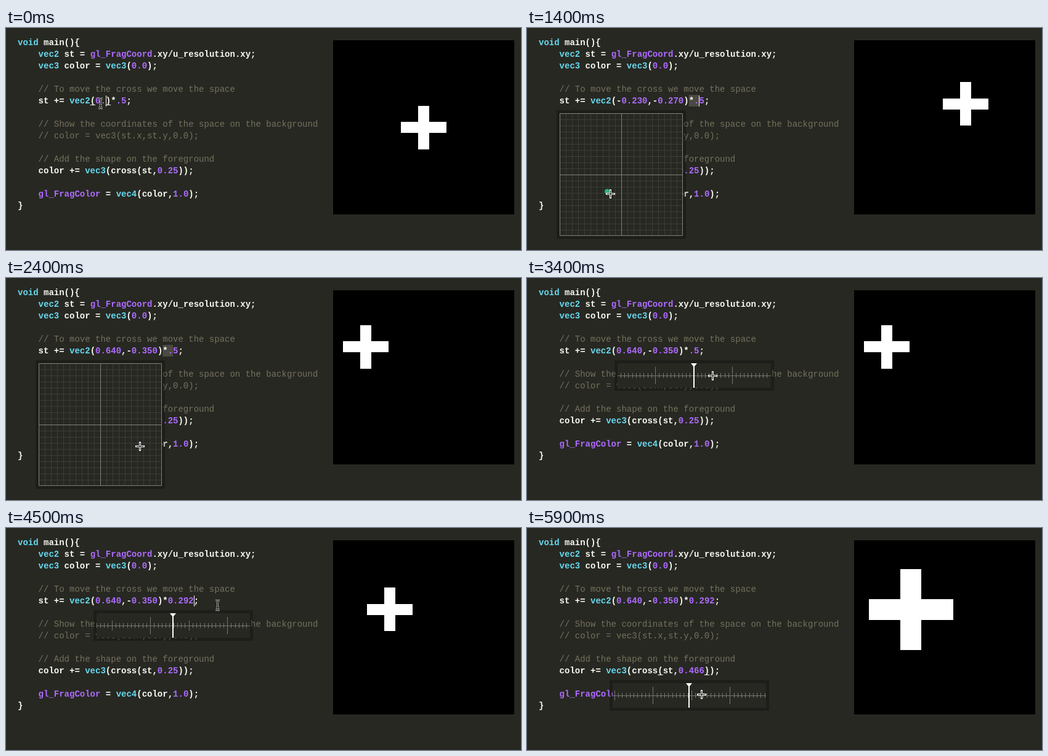
Write an HTML page that moves like this. It is 836 px wide and 362 px high and loops after 6 s.

```html
<!DOCTYPE html>
<html lang="en">
<head>
<meta charset="utf-8">
<title>Moving a cross in shader space</title>
<style>
  html, body { margin: 0; width: 100%; height: 100%; overflow: hidden; background: #272822; }
  svg { display: block; width: 836px; height: 362px; }
  text { font: bold 14px "Liberation Mono", "Courier New", monospace; fill: #f8f8f2; white-space: pre; }
  .type { fill: #66d9ef; }
  .num { fill: #ae6bff; }
  .note { fill: #75715e; font-weight: normal; }
</style>
</head>
<body>
<svg viewBox="0 0 836 362">
  <defs>
    <clipPath id="view"><rect x="531" y="20" width="294" height="284"/></clipPath>
    <clipPath id="track"><rect x="-124" y="-20" width="249" height="40"/></clipPath>
  </defs>
  <rect width="836" height="362" fill="#272822"/>
  <rect id="sel" height="19" fill="#4b4a42"/>
  <g id="code"></g>
  <path id="match" stroke="#f8f8f2" fill="none"/>
  <rect id="caret" width="1" height="18" fill="#f8f8f0"/>
  <rect x="531" y="20" width="294" height="284"/>
  <path id="cross" fill="#fff" clip-path="url(#view)" shape-rendering="crispEdges"/>

  <g id="pad">
    <path d="M48 134h210v210h-210zM53 139v200h200v-200z" fill="#000" fill-opacity=".25"/>
    <rect x="53" y="139" width="200" height="200" fill="#272822"/>
    <path id="grid" stroke="#3d3d38" fill="none"/>
    <path d="M53.5 139.5h199v199h-199zM153.5 139v200M53 239.5h200" stroke="#82827b" fill="none"/>
    <circle id="dot" r="4" fill="#2fb577"/>
  </g>

  <g id="slider">
    <path d="M-129 -25h259v50h-259zM-124 -20v40h249v-40z" fill="#000" fill-opacity=".25"/>
    <rect x="-124" y="-20" width="249" height="40" fill="#272822"/>
    <path id="ticks" stroke="#77776f" fill="none" clip-path="url(#track)"/>
    <path d="M-5 -20h10l-4 5v35h-2v-35z" fill="#fff"/>
  </g>

  <g id="mouse" fill="none">
    <path id="halo"/>
    <path id="core" stroke="#111"/>
  </g>
</svg>
<script>
const $ = id => document.getElementById(id);
const LOOP = 6000, STEP = 100;
const CHAR = 8.4, LEFT = 52.6;
const BEAM = "M-3 -8q3.5 0 3.5 3v10q0 3 -3.5 3M4 -8q-3.5 0 -3.5 3M4 8q-3.5 0 -3.5 -3M-2 3.5h5";
const PLUS = "M-5.5 .5h12M.5 -5.5v12";

// Eased 0 to 1 between two times
function ease(t, a, b) {
  const k = Math.min(1, Math.max(0, (t - a) / (b - a)));
  return k * k * (3 - 2 * k);
}
const within = (t, a, b) => t >= a && t < b;
const show = (id, on) => $(id).setAttribute("visibility", on ? "visible" : "hidden");
const set = (id, attrs) => { for (const k in attrs) $(id).setAttribute(k, attrs[k]); };

// The pad is dragged round in a spiral that ends at (.64, -.35)
const A = Math.atan2(-.27, -.23), B = Math.atan2(-.35, .64) + 2 * Math.PI;
const R = Math.hypot(.23, .27), S = Math.hypot(.35, .64);
function spiral(t) {
  const a = A + (B - A) * (Math.min(t, 2400) - 1400) / 1000;
  const r = R * ease(t, 700, 900) + (S - R) * ease(t, 2000, 2400);
  return [r * Math.cos(a), r * Math.sin(a)];
}

// Pointer glides: start, end, x, y
const glides = [
  [200, 500, 154, 239], [700, 2400, 217, 274], [2500, 2800, 275, 122],
  [3000, 3300, 301, 159], [3400, 4400, 327, 159], [4400, 4500, 343, 126],
  [4700, 5100, 268, 235], [5200, 5400, 310, 271], [5400, 5900, 283, 271]
];
function pointer(t, scalePx) {
  if (within(t, 800, 2400)) {
    const [x, y] = spiral(t + 22);
    return [153 + 100 * x, 239 - 100 * y];
  }
  if (within(t, 3400, 4400)) return [301 + scalePx, 159];
  let x = 153, y = 123;
  for (const [a, b, px, py] of glides) {
    const k = ease(t, a, b);
    x += (px - x) * k;
    y += (py - y) * k;
  }
  return [x, y];
}

function paint(line) {
  return line.replace(/\/\/.*|[A-Za-z_]\w*|\d+\.\d*|\.\d+/g, s => {
    const kind = s.startsWith("//") ? "note"
      : /^(void|vec\d)$/.test(s) ? "type"
      : /^(gl_|[\d.])/.test(s) ? "num" : "";
    return kind ? `<tspan class="${kind}">${s}</tspan>` : s;
  });
}

const lines = [
  "void main(){",
  "    vec2 st = gl_FragCoord.xy/u_resolution.xy;",
  "    vec3 color = vec3(0.0);",
  "",
  "    // To move the cross we move the space",
  "",
  "",
  "    // Show the coordinates of the space on the background",
  "    // color = vec3(st.x,st.y,0.0);",
  "",
  "    // Add the shape on the foreground",
  "",
  "",
  "    gl_FragColor = vec4(color,1.0);",
  "}"
];
$("code").innerHTML = lines.map((s, i) =>
  `<text x="19" y="${28 + 19 * i}">${paint(s)}</text>`).join("");
const rows = $("code").children;

let grid = "";
for (let i = 10; i < 200; i += 10) grid += `M${53.5 + i} 140v198M54 ${139.5 + i}h198`;
set("grid", { d: grid });

function drawCross(x, y, scale, size) {
  const cx = 678 - x * scale * 294, cy = 162 + y * scale * 284;
  const bar = (w, h) => `M${cx - w * 147} ${cy - h * 142}h${w * 294}v${h * 284}h${-w * 294}z`;
  set("cross", { d: bar(size, size / 4) + bar(size / 4, size) });
}

function drawSlider(x, y, value) {
  let d = "M-125 .5h250";
  for (let n = Math.ceil((value - 1) * 20); n <= (value + 1) * 20; n++) {
    const h = n % 20 === 0 ? 14 : n % 10 === 0 ? 8 : 4;
    d += `M${Math.floor((n / 20 - value) * 125) + .5} ${-h}v${2 * h}`;
  }
  set("ticks", { d });
  set("slider", { transform: `translate(${x} ${y})` });
}

function render(t) {
  const [x, y] = spiral(t).map(v => Math.round(v * 100) / 100);
  // One pixel of slider drag changes a value by .008
  const scalePx = Math.round(33 * ease(t, 3400, 3900) - 7 * ease(t, 4200, 4400));
  const scale = .5 - scalePx * .008;
  const size = .25 + Math.round(27 * ease(t, 5400, 5900)) * .008;

  const vec = t < 800 ? "0." : `${x.toFixed(3)},${y.toFixed(3)}`;
  const mul = t < 3500 ? ".5" : scale.toFixed(3);
  const dim = t < 5500 ? "0.25" : size.toFixed(3);
  const move = `st += vec2(${vec})*${mul};`;
  rows[5].innerHTML = paint("    " + move);
  rows[11].innerHTML = paint(`    color += vec3(cross(st,${dim}));`);
  drawCross(x, y, scale, size);

  // Selection, caret and bracket matching
  const early = t < 400, late = t >= 5200;
  const selected = within(t, 400, 2700);
  const star = move.indexOf("*");
  const from = t < 800 ? 12 : star, to = star + 2;
  show("sel", selected);
  set("sel", { x: LEFT + from * CHAR, y: 109, width: (to - from) * CHAR });
  const col = late ? 23 + dim.length : early ? 13 : selected ? to : move.length - 1;
  show("caret", [0, 1000, 2900, 4400, 5200].some(a => within(t, a, a + 500)));
  set("caret", { x: Math.round(LEFT + col * CHAR), y: late ? 224 : 110 });
  const under = c => `M${LEFT + c * CHAR} ${late ? 239.5 : 125.5}h${CHAR}`;
  show("match", late || early);
  set("match", { d: under(late ? 19 : 10) + under(col) });

  // Pickers
  const pad = within(t, 200, 2700), first = within(t, 2900, 4700);
  show("pad", pad);
  show("dot", within(t, 800, 2400));
  set("dot", { cx: 153 + 100 * x, cy: 239.5 - 100 * y });
  show("slider", first || late);
  if (late) drawSlider(263, 273, size);
  else drawSlider(271, 159, scale);

  const [mx, my] = pointer(t, scalePx);
  const inside = (a, b, c, d) => mx > a && mx < c && my > b && my < d;
  const plus = pad && inside(48, 134, 258, 344) || first && inside(141, 134, 401, 184)
    || late && inside(133, 248, 393, 298);
  const d = plus ? PLUS : BEAM;
  set("halo", { d, stroke: plus ? "#fff" : "#a5a59f", "stroke-width": 3,
    "stroke-linecap": plus ? "square" : "butt" });
  set("core", { d });
  set("mouse", { transform: `translate(${Math.round(mx)} ${Math.round(my)})` });
}

const start = performance.now();
function tick(now) {
  const t = Math.max(0, now - start) % LOOP;
  render(Math.floor(t / STEP) * STEP);
  requestAnimationFrame(tick);
}
render(0);
requestAnimationFrame(tick);
</script>
</body>
</html>
```
